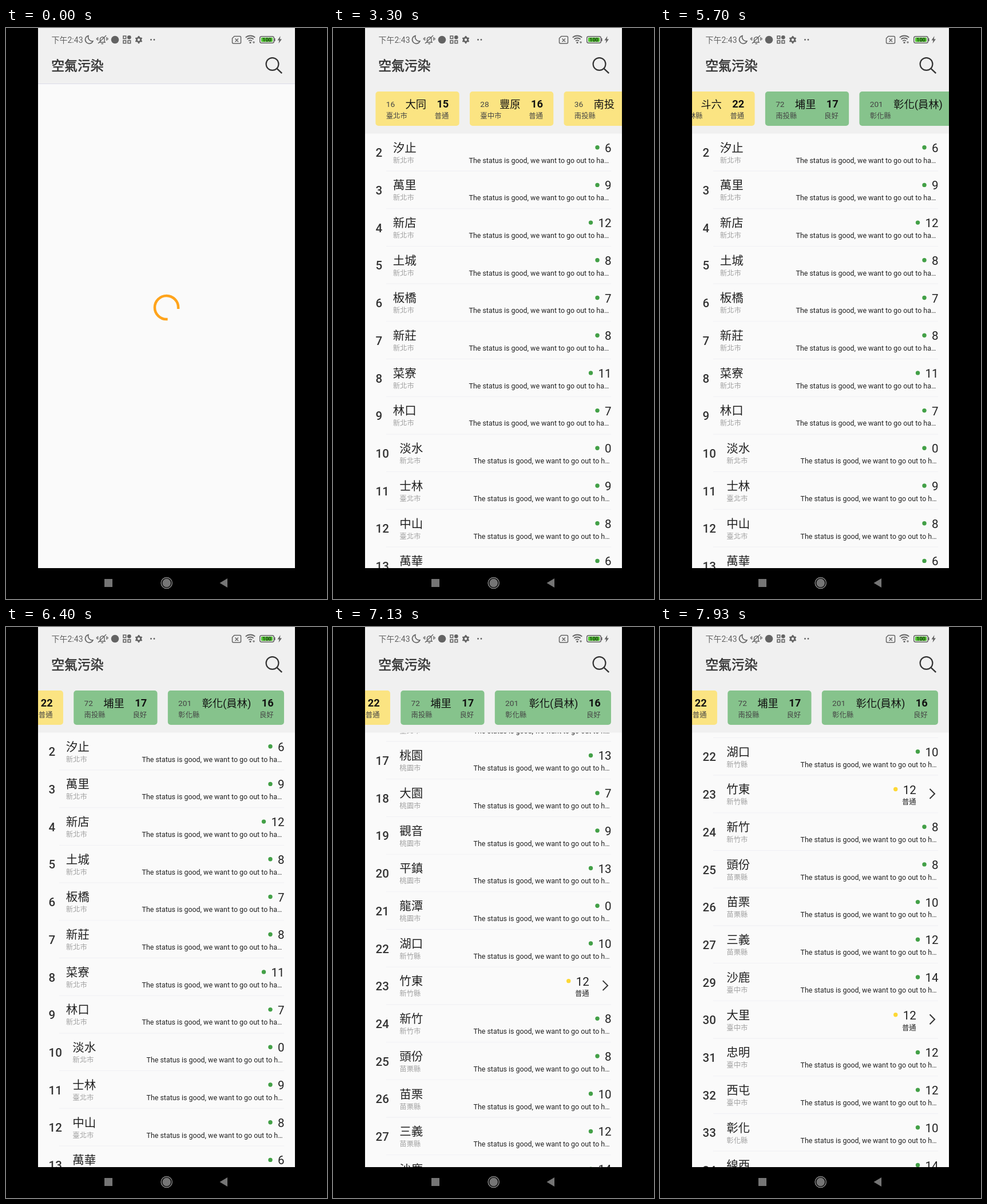
An HTML page with a canvas for the animation above (8 s loop, 561x998 px).

```html
<!DOCTYPE html>
<html lang="zh-Hant">
<head>
<meta charset="utf-8">
<title>空氣污染</title>
<style>
html, body { margin: 0; width: 100%; height: 100%; overflow: hidden; background: #000; }
canvas { display: block; }
</style>
</head>
<body>
<canvas id="stage" width="561" height="998"></canvas>
<script>
const g = document.getElementById('stage').getContext('2d');
const TAU = Math.PI * 2, LOOP = 8000, STEP = 100 / 3;
const LEFT = 56, RIGHT = 505, BOTTOM = 944;
const INK = '#333', ICON = '#636363', BAR = '#f0f0f0', PAGE = '#fafafa';
const GREEN = '#43a047', YELLOW = '#fdd835';
const FONTS = 'Roboto, "Noto Sans CJK TC", "Noto Sans CJK JP", sans-serif';
const ROW = 65.7, LIST_TOP = 184.5, PAD = 18.3;

// id, name, value, and a mark when rated "moderate" instead of "good"
const rows = [];
const addRows = (county, list) => list.split(' ').forEach(item => {
  const [id, name, value, moderate] = item.split(',');
  rows.push({ id, name, value, county, moderate });
});
addRows('新北市', '2,汐止,6 3,萬里,9 4,新店,12 5,土城,8 6,板橋,7 7,新莊,8 8,菜寮,11 9,林口,7 10,淡水,0');
addRows('臺北市', '11,士林,9 12,中山,8 13,萬華,6 14,古亭,7 15,松山,8');
addRows('桃園市', '17,桃園,13 18,大園,7 19,觀音,9 20,平鎮,13 21,龍潭,0');
addRows('新竹縣', '22,湖口,10 23,竹東,12,y');
addRows('新竹市', '24,新竹,8');
addRows('苗栗縣', '25,頭份,8 26,苗栗,10 27,三義,12');
addRows('臺中市', '29,沙鹿,14 30,大里,12,y 31,忠明,12 32,西屯,12');
addRows('彰化縣', '33,彰化,10 34,線西,14');

const cards = [
  ['16', '大同', '15', '臺北市', '普通'],
  ['28', '豐原', '16', '臺中市', '普通'],
  ['36', '南投', '19', '南投縣', '普通'],
  ['37', '斗六', '22', '雲林縣', '普通'],
  ['72', '埔里', '17', '南投縣', '良好'],
  ['201', '彰化(員林)', '16', '彰化縣', '良好'],
];

function text(str, x, y, size, color, weight = 400, align = 'left') {
  g.font = `${weight} ${size}px ${FONTS}`;
  g.fillStyle = color;
  g.textAlign = align;
  g.fillText(str, x, y);
}

function rect(x, y, w, h, color, r = 0) {
  g.fillStyle = color;
  g.beginPath();
  g.roundRect(x, y, w, h, r);
  g.fill();
}

function disc(x, y, r, color) {
  g.fillStyle = color;
  g.beginPath();
  g.arc(x, y, r, 0, TAU);
  g.fill();
}

function arc(x, y, r, from, to, color, width) {
  g.strokeStyle = color;
  g.lineWidth = width;
  g.beginPath();
  g.arc(x, y, r, from, to);
  g.stroke();
}

function path(d, color, width) {
  const p = new Path2D(d);
  if (width) {
    g.strokeStyle = color;
    g.lineWidth = width;
    g.stroke(p);
  } else {
    g.fillStyle = color;
    g.fill(p);
  }
}

function clipped(x, y, w, h, draw) {
  g.save();
  g.beginPath();
  g.rect(x, y, w, h);
  g.clip();
  draw();
  g.restore();
}

const clamp = v => Math.min(1, Math.max(0, v));

// cubic-bezier(.4, 0, .2, 1)
function fastOutSlowIn(x) {
  let lo = 0, hi = 1, s = 0.5;
  for (let i = 0; i < 20; i++) {
    s = (lo + hi) / 2;
    if (1.2 * s * (1 - s) ** 2 + 0.6 * s * s * (1 - s) + s ** 3 < x) lo = s; else hi = s;
  }
  return 3 * s * s - 2 * s ** 3;
}

function statusBar() {
  text('下午2:43', 79.5, 25.5, 14, ICON);
  path('M144 13.5A7 7 0 1 0 152 23A7.2 7.2 0 0 1 144 13.5Z', ICON, 1.6);
  path('M163 25H174M164.5 25V19A4 4 0 0 1 172 18V25M166.5 27.5H170M161 27L175 13M160.5 16V22M158.5 17.5V20.5M176 16V22M178 17.5V20.5', ICON, 1.4);
  disc(190.5, 20.5, 6.8, ICON);
  g.strokeStyle = ICON;
  g.lineWidth = 1.6;
  for (const [x, y] of [[205, 14], [205, 22], [213, 22]]) g.strokeRect(x, y, 4.6, 4.6);
  disc(215.3, 16.3, 3.4, ICON);
  arc(232, 20.5, 3.6, 0, TAU, ICON, 2.8);
  for (let i = 0; i < 6; i++) {
    const a = (i + 0.5) * TAU / 6;
    disc(232 + 5.2 * Math.cos(a), 20.5 + 5.2 * Math.sin(a), 1.5, ICON);
  }
  disc(253.5, 20.5, 1.4, ICON);
  disc(259, 20.5, 1.4, ICON);

  path('M399 14.5H408.5Q410.5 14.5 410.5 16.5V25Q410.5 27 408.5 27H397.5Q395.5 27 395.5 25V18ZM400.5 18.5L406 24M406 18.5L400.5 24', ICON, 1.5);
  for (const r of [4.5, 8.5, 12.5]) arc(427, 26, r, -TAU * 0.365, -TAU * 0.135, ICON, 1.8);
  disc(427, 25.5, 1.6, ICON);
  path('M431 25H435M433 23V27', ICON, 1);
  g.strokeStyle = ICON;
  g.lineWidth = 1.5;
  g.beginPath();
  g.roundRect(443.7, 14.7, 24.6, 11.6, 3);
  g.stroke();
  rect(446, 16.8, 20, 7.5, '#4fc52f', 1);
  rect(469, 18, 1.5, 5, ICON);
  text('100', 456, 24, 9, '#1d3a16', 700, 'center');
  path('M479.5 14L474.5 21.5H477.5L476.5 27L482 19.5H478.7Z', ICON);
}

function navBar() {
  rect(172, 963, 14, 14, '#757575');
  arc(280.7, 970, 9.6, 0, TAU, '#858585', 1.5);
  disc(280.7, 970, 7.4, '#757575');
  path('M373.5 970L387 962V978Z', '#757575');
}

function header(height) {
  rect(LEFT, 0, RIGHT - LEFT, height, BAR);
  statusBar();
  text('空氣污染', 79.3, 74, 22.8, INK, 500);
  // thin outline gives the medium weight
  g.strokeStyle = INK;
  g.lineWidth = 0.6;
  g.strokeText('空氣污染', 79.3, 74);
  arc(465.5, 63, 10.9, 0, TAU, INK, 2.2);
  path('M473.2 70.7L482.2 79.2', INK, 2.4);
}

function spinner(t) {
  const phase = (t / 1333 + 0.506) % 1;
  const head = fastOutSlowIn(clamp(phase * 2));
  const tail = fastOutSlowIn(clamp(phase * 2 - 1));
  const turn = t / 2222 + 0.375;
  const start = TAU * (-0.25 + 0.75 * tail + turn + 0.25 * phase);
  g.lineCap = 'square';
  arc(280.5, 488.5, 20.6, start, start + Math.max(0.001, 0.75 * TAU * (head - tail)), '#ffa41c', 4.5);
  g.lineCap = 'butt';
}

function drawRow(row, top) {
  const wide = row.id.length > 1;
  const x = wide ? 116.3 : 104.7;
  const right = row.moderate ? 447.7 : 486.5;
  text(row.id, 74.6, top + 40.8, 20.5, INK, 500);
  text(row.name, x, top + 32, 20.5, '#222');
  text(row.county, x, top + 51, 12.4, '#a0a0a0');
  text(row.value, right, top + 32.2, 20.5, '#222', 400, 'right');
  disc(right - 13 - 11.5 * row.value.length, top + 24.2, 3.7, row.moderate ? YELLOW : GREEN);
  if (row.moderate) {
    text('普通', right, top + 51, 12.4, '#222', 400, 'right');
    path(`M471.5 ${top + 23.7}L480 ${top + 32.2}L471.5 ${top + 40.7}`, INK, 2);
  } else {
    text(`The status is good, we want to go out to ${wide ? 'h' : 'ha'}…`, wide ? 245.6 : 237.6, top + 51, 12.4, '#222');
  }
  rect(93, top + ROW - 0.7, 393, 1, '#f0f0f4');
}

// Returns the left edge of the next card.
function drawCard([id, name, value, county, status], x) {
  g.font = `400 ${PAD}px ${FONTS}`;
  const nameX = PAD * 2 + id.length * 7.7;
  const w = nameX + g.measureText(name).width + PAD * 2 + 21.1;
  const right = x + w - PAD;
  rect(x, 111, w, 60, status === '良好' ? '#86c38c' : '#fbe482', 5);
  text(id, x + PAD, 138, 13.7, '#444');
  text(name, x + nameX, 139.6, PAD, '#111');
  text(value, right, 139.4, PAD, '#111', 700, 'right');
  text(county, x + PAD, 158, 12.4, '#444');
  text(status, right, 158, 12.4, '#444', 400, 'right');
  return x + w + PAD;
}

function cardScroll(t) {
  return t < 5330 ? 0 : 21.8 + 592.6 * (1 - (1 - clamp((t - 5333) / 550)) ** 2);
}

// A short accelerating drag, then a fling that slows down.
function listScroll(t) {
  return 200 * clamp((t - 6690) / 130) ** 2 + 1039.3 * (1 - (1 - clamp((t - 6820) / 1230)) ** 3.848);
}

function edgeGlow(t) {
  const alpha = 0.1 * clamp((t - 5880) / 120) * clamp((6400 - t) / 300);
  g.fillStyle = `rgba(255, 164, 28, ${alpha})`;
  g.beginPath();
  g.ellipse(RIGHT, 141, 7, 45, 0, 0, TAU);
  g.fill();
}

function listPage(t) {
  const scroll = listScroll(t);
  clipped(LEFT, LIST_TOP, RIGHT - LEFT, BOTTOM - LIST_TOP, () => rows.forEach((row, i) => {
    drawRow(row, LIST_TOP + i * ROW - scroll);
  }));
  header(LIST_TOP);
  clipped(LEFT, 111, RIGHT - LEFT, 60, () => {
    let x = 74.4 - cardScroll(t);
    for (const card of cards) x = drawCard(card, x);
    edgeGlow(t);
  });
}

function loadingPage(t) {
  header(97);
  rect(LEFT, 97, RIGHT - LEFT, 1, '#dcdce8');
  spinner(Math.min(t, 3030));
}

function draw(elapsed) {
  // 30 pictures per second, each shown a few ms early
  const t = Math.floor((elapsed % LOOP + 4) / STEP) * STEP;
  rect(0, 0, 561, 998, '#000');
  rect(LEFT, 0, RIGHT - LEFT, BOTTOM, PAGE);
  if (t < 3199) loadingPage(t); else listPage(t);
  navBar();
}

const origin = performance.now();
function tick() {
  draw(performance.now() - origin);
  requestAnimationFrame(tick);
}
tick();
</script>
</body>
</html>
```
